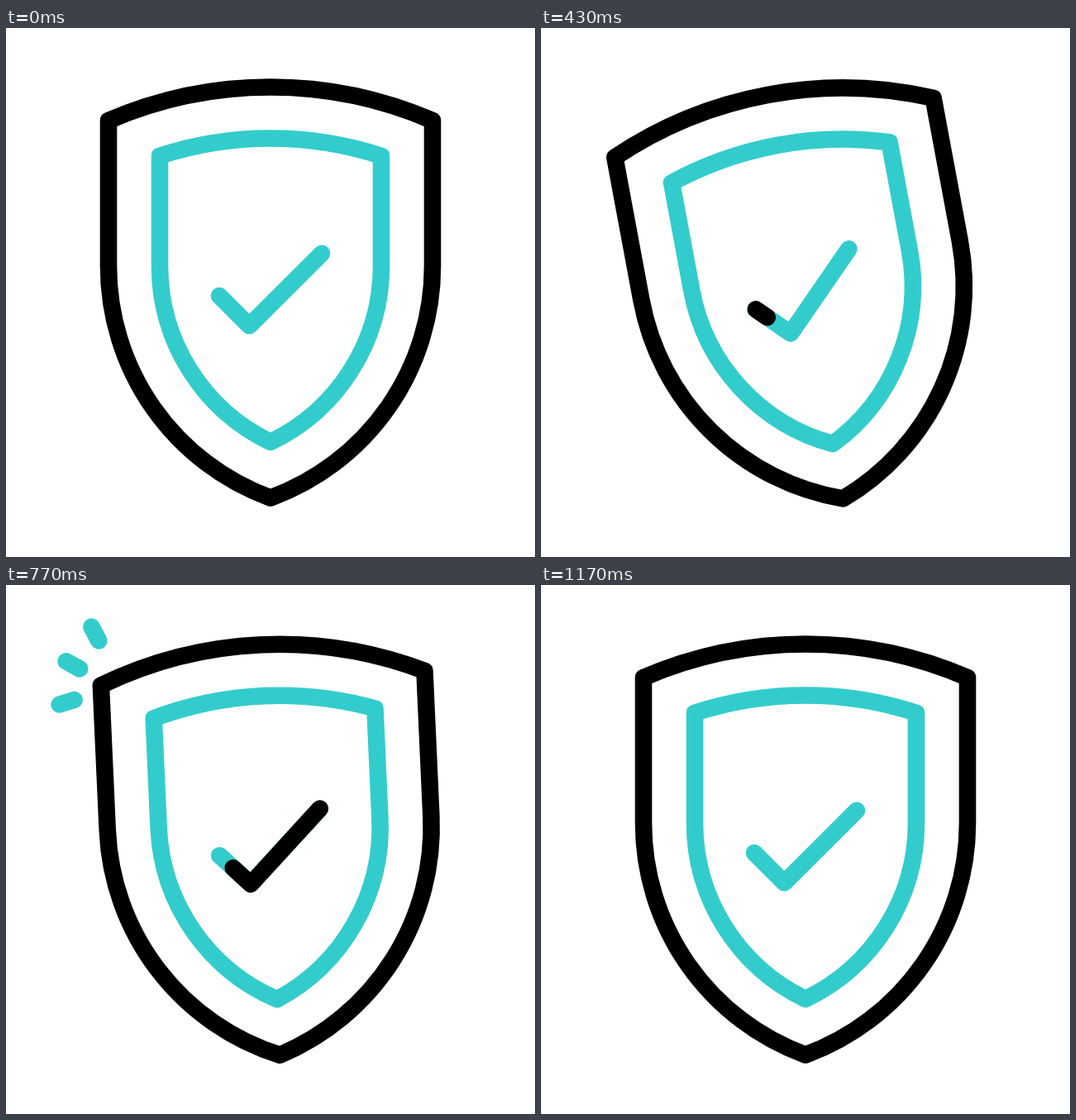
Write an HTML page with a canvas that moves like this. It is 640 by 640 pixels and loops after 1.67 s.

```html
<!DOCTYPE html>
<html lang="en">
<head>
<meta charset="utf-8">
<title>Shield check</title>
<style>
  html, body { margin: 0; background: #fff; overflow: hidden; }
  canvas { display: block; }
</style>
</head>
<body>
<canvas id="stage" width="640" height="640"></canvas>
<script>
const ctx = document.getElementById('stage').getContext('2d');
const BLACK = '#000', TEAL = '#33cccc';
const LOOP = 1670, CENTER = 320;

// Keys are [tick, value] pairs; 30 ticks per second.
const LIFT = [[0, 0], [8, 50.5], [18, -40.3], [27.2, 31.8], [35, 0]];
const TILT = [[2, 0], [10.65, -16], [18.25, 8], [24.3, -4], [28.6, 1.5], [32.6, 0]];
const CHECK_HEAD = [[10.8, 0], [22.2, 1]];
const CHECK_TAIL = [[20.7, 0], [31, 1]];
const SPARK_HEAD = [[21.1, 0], [26, 1]];
const SPARK_TAIL = [[22.8, 0], [28.5, 1]];

const outer = new Path2D('M124 112A494.6 494.6 0 0 1 516 112V288A298.6 298.6 0 0 1 320 568.5A298.6 298.6 0 0 1 124 288Z');
const inner = new Path2D('M186 154.8A432.6 432.6 0 0 1 454 154.8V288A236.5 236.5 0 0 1 320 501A236.5 236.5 0 0 1 186 288Z');
const check = new Path2D('M258 324L294.3 360.3L382 272.8');
const CHECK_LENGTH = 175.2;

// Inner end and outward direction of each spark.
const SPARK_LENGTH = 57;
const sparks = [
  [123.9, 58, -0.427, -0.906],
  [99.4, 90.9, -0.854, -0.52],
  [91.2, 128, -0.968, 0.249]
].map(([x, y, dx, dy]) =>
  new Path2D(`M${x} ${y}l${dx * SPARK_LENGTH} ${dy * SPARK_LENGTH}`));

function valueAt(keys, tick) {
  if (tick <= keys[0][0]) return keys[0][1];
  for (let i = 1; i < keys.length; i++) {
    const [t0, v0] = keys[i - 1], [t1, v1] = keys[i];
    if (tick < t1) {
      const u = (tick - t0) / (t1 - t0);
      return v0 + (v1 - v0) * u * u * (3 - 2 * u);
    }
  }
  return keys[keys.length - 1][1];
}

function stroke(path, color) {
  ctx.strokeStyle = color;
  ctx.stroke(path);
}

function strokePart(path, color, length, tail, head) {
  if (head - tail < 0.001) return;
  ctx.setLineDash([(head - tail) * length, 2 * length]);
  ctx.lineDashOffset = -tail * length;
  stroke(path, color);
  ctx.setLineDash([]);
}

function draw(tick) {
  ctx.setTransform(1, 0, 0, 1, 0, 0);
  ctx.fillStyle = '#fff';
  ctx.fillRect(0, 0, 640, 640);
  ctx.lineWidth = 20.6;
  ctx.lineCap = ctx.lineJoin = 'round';

  ctx.translate(CENTER, CENTER + valueAt(LIFT, tick));
  ctx.rotate(valueAt(TILT, tick) * Math.PI / 180);
  ctx.translate(-CENTER, -CENTER);

  stroke(outer, BLACK);
  stroke(inner, TEAL);
  stroke(check, TEAL);
  strokePart(check, BLACK, CHECK_LENGTH, valueAt(CHECK_TAIL, tick), valueAt(CHECK_HEAD, tick));
  for (const spark of sparks)
    strokePart(spark, TEAL, SPARK_LENGTH, valueAt(SPARK_TAIL, tick), valueAt(SPARK_HEAD, tick));
}

// Three steps per 100 ms, lasting 30, 40 and 30 ms.
function tickAt(ms) {
  const rest = ms % 100;
  return Math.floor(ms / 100) * 3 + (rest >= 30) + (rest >= 70);
}

const start = performance.now();
function loop() {
  draw(tickAt((performance.now() - start) % LOOP));
  requestAnimationFrame(loop);
}
loop();
</script>
</body>
</html>
```
